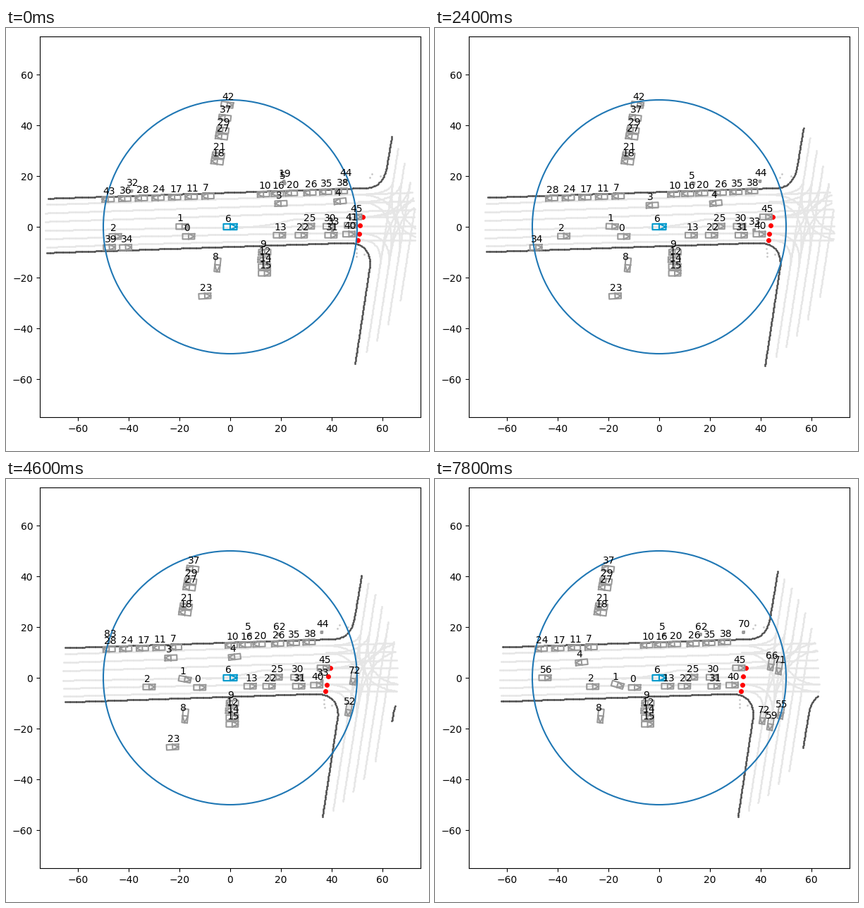
A matplotlib script for the animation above (8000 ms loop, 600 px wide and 600 px high).

```python
import numpy as np
import matplotlib.pyplot as plt
from matplotlib.animation import FuncAnimation

FRAMES, INTERVAL = 40, 200
SIGHT = 50
EGO = 6
LANE, EDGE, CROSSING = (230 / 255,) * 3, (80 / 255,) * 3, (200 / 255,) * 3
GREY, BLUE = (0.6, 0.6, 0.6), (0, 0.6, 0.8)

fig = plt.figure(figsize=(6, 6), dpi=100)
ax = fig.add_axes([0.08, 0.08, 0.9, 0.9])
ax.set(xlim=(-75, 75), ylim=(-75, 75))


def travelled(n):
    """Distance the ego car has covered after n steps, slowing down."""
    return 0.6815 * n - 0.0056 * n * n


# ---- road map, in metres ----
WEST, STOP, EAST = -77.2, 50.6, 83
SLOPE, LEAN = 0.033, 0.155


def bend(p0, c, p1):
    t = np.linspace(0, 1, 40)[:, None]
    p0, c, p1 = map(np.array, (p0, c, p1))
    return (1 - t) ** 2 * p0 + 2 * t * (1 - t) * c + t * t * p1


def dots(*parts, step=0.5):
    """Evenly spaced points along the joined parts."""
    line = np.vstack(parts)
    dist = np.r_[0, np.cumsum(np.hypot(*np.diff(line, axis=0).T))]
    at = np.arange(0, dist[-1], step)
    return np.c_[np.interp(at, dist, line[:, 0]), np.interp(at, dist, line[:, 1])]


def cross(k, y):
    """Point at height y on lane k of the crossing road."""
    return 61.3 + 3.4 * k + LEAN * y, y


def turn(x, y, k, end):
    """Curve from (x, y) into crossing lane k, rounding their corner."""
    return dots(bend((x, y), cross(k, y), cross(k, end)))


def kerb(x):
    return x, 13.55 + SLOPE * x


edges = np.vstack([
    dots([kerb(WEST)], bend(kerb(53.3), (60.3, 15.6), (61.7, 23.9)), [(65.3, 45.3)]),
    dots([(WEST, -10.4)], bend((46.9, -6.25), (55, -6.7), (55.1, -14.7)), [(48.6, -57.8)]),
    dots(bend((82.5, -6.7), (78.1, -7.2), (76.9, -14.2)), [(73.6, -34.2)]),
])

parts = [dots([cross(k, -60), cross(k, 60)]) for k in range(5)]
for k in range(3):
    left = 8.6 - 3.35 * k
    westbound = [(x, left + SLOPE * (x - WEST)) for x in (WEST, EAST)]
    left, stop = left - 10.2, 0.4 - 2.8 * k
    eastbound = bend((WEST, left), (-20, stop - 0.6), (STOP, stop))
    parts += [dots(westbound), dots(eastbound, [(EAST, stop)])]
parts.append(dots(bend((3.3, -0.2), (13, 0), (25, 3)), [(STOP, 3.9), (EAST, 3.9)]))
for k in range(2):
    parts += [
        turn(STOP, 12.8 - 2.9 * k, k, 18),
        turn(STOP, 12.8 - 2.9 * k, 2 - k, -13),
        turn(STOP, 3.9, 3 - k, 17),
        turn(STOP, -5 + 2.5 * k, k, -16),
        turn(EAST, 13.9 - 2.9 * k, k, -12),
        turn(EAST, -5.5 + 2.8 * k, k, 17),
    ]
lanes = np.vstack(parts)

crossing = np.vstack([np.linspace((49.7, -8.6), (49.8, -11.7), 3),
                      np.linspace((55, 19.4), (55.8, 20.8), 2),
                      [(52.8, -10.8), (59.2, 20)]])
signals = np.array([(52.1, 3.9), (51.2, 0.6), (50.7, -2.8), (50.3, -5.2)])

layers = [(pts, ax.plot([], [], '.', color=col, ms=2)[0])
          for pts, col in ((lanes, LANE), (edges, EDGE), (crossing, CROSSING))]
signal_dots, = ax.plot([], [], 'o', color='red', ms=4, zorder=3)

# ---- road users ----
agents = []


def add(name, x, y, head=0, size=(4.7, 2.1), v=(0, 0), a=(0, 0), span=(0, FRAMES)):
    """World position after n steps is (x, y) + v n + a n^2, shown during span."""
    agents.append(dict(
        name=name, p=np.array([x, y]), v=np.array(v), a=np.array(a),
        head=head, size=size, span=span,
        line=ax.plot([], [], color=BLUE if name == EGO else GREY, zorder=4)[0],
        label=ax.text(0, 0, str(name), zorder=10, clip_on=True)))


def row(names, start, step, head=0):
    """Standing cars at equal steps; None leaves a slot empty."""
    for i, name in enumerate(names):
        if name is not None:
            add(name, start[0] + i * step[0], start[1] + i * step[1], head)


def southbound(name, k, y, span=(0, FRAMES), speed=0.97):
    add(name, *cross(k, y), 261, v=(-LEAN * speed, -speed), span=span)


def walker(x, y, speed, *sightings):
    """One pedestrian, relabelled each time it is picked up again."""
    for name, start, end in sightings:
        add(name, x, y, size=(0.7, 0.7), v=(speed, 0), span=(start, end))


# along the kerbs
row((43, 36, 28, 24, 17, 11, 7), (-48.1, 10.9), (6.55, 0.2), 182)
row((10, 16, 20), (13.1, 12.9), (5.5, 0.2), 182)
row((26, 35, 38), (31.4, 13.5), (6.2, 0.3), 182)
row((39, 34), (-47.6, -8.1), (6.4, 0), 2)

# parking lots
row((42,), (-1.2, 48.1), (0, 0), -8)
row((37, None, 29, 27, None, None, 21, 18), (-2.1, 43), (-0.43, -2.47), 173)
row((9, 12), (13.6, -10), (-0.3, -2.9), 180)
row((14, 15), (13.5, -15.7), (0, -2.6))
add(8, -5.0, -15, 264, (5.4, 2.1))
add(23, -10, -27.3, 3, span=(0, 24))

# queue at the lights
row((25, 30), (30.8, 0.2), (8.2, 0))
row((31, 40), (39.7, -3.3), (7.1, 0.4))
row((22,), (28, -3.3), (0, 0))
row((45,), (49.4, 3.9), (0, 0))
add(41, 47.4, 0.6, span=(0, 3))

# moving traffic
add(13, 19.4, -3.3, v=(0.05, 0))
add(0, -16.4, -3.8, v=(0.9, 0), a=(-0.0068, 0))
add(1, -18.95, 0.1, lambda n: np.clip(-0.7 * (n - 8), -17, 0),
    v=(0.7, 0.036), a=(-0.0044, -0.0028))
add(2, -45.3, -3.8, v=(1.39, 0.008), a=(-0.0112, 0))
add(3, 20, 9.2, 182, v=(-1.222, -0.057), a=(-0.0048, 0))
add(4, 43.3, 10.1, 186, v=(-1.002, -0.048), a=(-0.011, -0.0014))
add(56, -64.85, 0, v=(0.972, 0))
southbound(52, 0, 9.7, span=(0, 31))
southbound(72, 0, 22)
southbound(66, 0, 43.2)
southbound(59, 1, 19.6)
southbound(71, 1, 41.6)
southbound(55, 2, 24.1)

# people on foot
walker(21.4, 17, -0.038, (5, 0, FRAMES))
walker(21.1, 17.8, 0, (19, 0, 3))
walker(-38.9, 14.1, 0.17, (32, 0, 9), (83, 17, FRAMES))
walker(40.3, -1.3, 0.37, (33, 0, 24), (104, 24, 31))
walker(45.2, 17.9, 0.155, (44, 0, 31), (70, 36, FRAMES))
walker(28.05, 17, 0.16, (62, 16, FRAMES))

add(EGO, 0, 0, size=(5.3, 2.3))

# unit outline, then the heading triangle, split by a gap
SHAPE = 0.5 * np.array([(1, 1), (1, -1), (-1, -1), (-1, 1), (1, 1), (np.nan, np.nan),
                        (0, 1), (0, -1), (1, 0), (0, 1)])

ax.add_patch(plt.Circle((0, 0), SIGHT, fill=False, ec='C0', lw=1.5, zorder=5))


def place(agent, n, shift):
    p = agent['p'] + agent['v'] * n + agent['a'] * n * n
    if agent['name'] != EGO:
        p = p - shift
    start, end = agent['span']
    shown = start <= n < end and np.hypot(*p) < SIGHT
    agent['line'].set_visible(shown)
    agent['label'].set_visible(shown)
    head = agent['head'](n) if callable(agent['head']) else agent['head']
    c, s = np.cos(np.radians(head)), np.sin(np.radians(head))
    box = SHAPE * agent['size'] @ np.array([(c, s), (-s, c)]) + p
    agent['line'].set_data(*box.T)
    agent['label'].set_position(p + (-2, 2))


def draw(n):
    shift = np.array([travelled(n), 0])
    reach = 73.05 - 0.555 * shift[0]
    for pts, line in layers:
        near = pts - shift
        line.set_data(*near[np.hypot(*near.T) < reach].T)
    signal_dots.set_data(*(signals - shift).T)
    for agent in agents:
        place(agent, n, shift)
    return []


anim = FuncAnimation(fig, draw, frames=FRAMES, init_func=lambda: draw(0),
                     interval=INTERVAL, repeat=True, repeat_delay=0)
plt.show()
```
